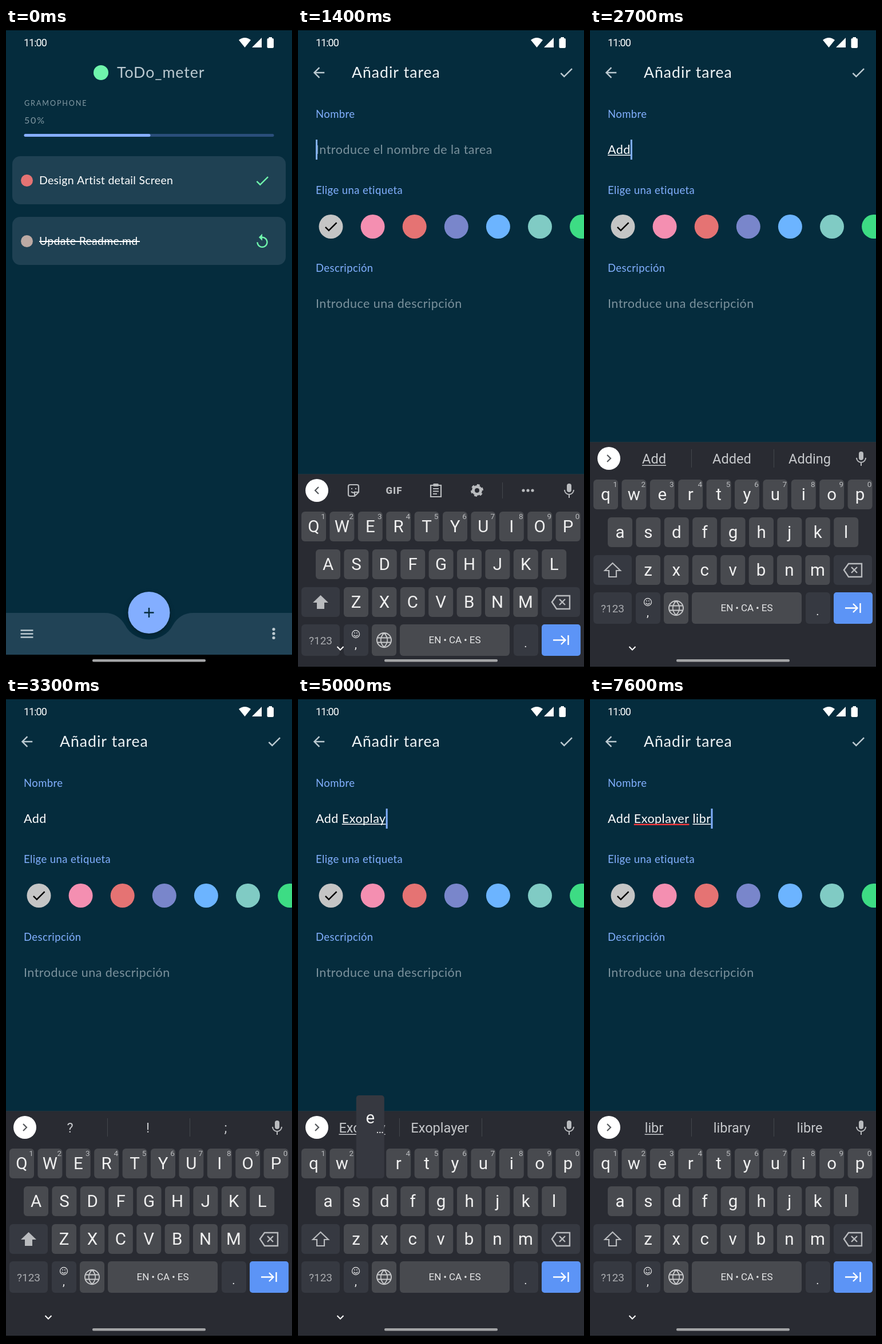
These frames come from a looping animation (500 px wide and 1120 px high, 8 s). An HTML page with a canvas:

```html
<!DOCTYPE html>
<html lang="es">
<head>
<meta charset="utf-8">
<style>
html, body { margin: 0; width: 500px; height: 1120px; overflow: hidden; background: #000; }
canvas { display: block; }
</style>
</head>
<body>
<canvas id="stage" width="500" height="1120"></canvas>
<script>
const ctx = document.getElementById('stage').getContext('2d');
const LOOP = 8000, TICK = 100;
const BG = '#052c3d', KEY = '#484a4f', DARK_KEY = '#363941', ICON = '#b9bbbe';
const MINT = '#6ff5ac', BLUE = '#82b0ff', PALE = '#bccad1', WHITE = '#fff';

// Text styles: font and letter spacing
const APP = 'Lato, sans-serif', SYSTEM = 'Roboto, sans-serif';
const title = [`26.7px ${APP}`, .95], label = [`18.5px ${APP}`, .4];
const input = [`21.5px ${APP}`, .48], task = [`19.5px ${APP}`, .28];
const letter = [`29.5px ${SYSTEM}`, 0], word = [`23.6px ${SYSTEM}`, 0];

// Icons on a 24 unit grid
const DP = 1.216;
const CHECK = 'M9 16.170L4.830 12l-1.420 1.410L9 19 21 7l-1.410-1.410z';
const BACK = 'M20 11H7.830l5.590-5.590L12 4l-8 8 8 8 1.410-1.410L7.830 13H20z';
const PLUS = 'M19 13h-6v6h-2v-6H5v-2h6V5h2v6h6z';
const MENU = 'M3 18h18v-2H3zM3 13h18v-2H3zM3 6v2h18V6z';
const REPLAY = 'M12 5V1L7 6l5 5V7c3.310 0 6 2.690 6 6s-2.690 6-6 6-6-2.690-6-6H4c0 4.420 3.580 8 8 8s8-3.580 8-8-3.580-8-8-8z';

// Typing: key down, commit, settled text, word being typed, suggestions
const typing = [
  [1300, 1300, '', '', null],
  [1700, 2100, '', 'A', 'A|And|Ara'],
  [2400, 2500, '', 'Ad', 'Ad|Add|And'],
  [2600, 2700, '', 'Add', 'Add|Added|Adding'],
  [2800, 2800, 'Add ', '', '?|!|;'],
  [3400, 3500, 'Add ', 'E', 'E|Each|Every'],
  [3700, 3800, 'Add ', 'Ex', 'Ex|Extra|Exit'],
  [3900, 4000, 'Add ', 'Exo', 'Exo|Exotic|Exodus'],
  [4200, 4200, 'Add ', 'Exop', 'Exop|Exoplanet|Exoplayer'],
  [4400, 4400, 'Add ', 'Exopl', 'Exopl|Exoplayer|Exoplanet'],
  [4600, 4600, 'Add ', 'Exopla', 'Exopla|Exoplayer|'],
  [4800, 4900, 'Add ', 'Exoplay', 'Exoplay|Exoplayer|'],
  [5000, 5100, 'Add ', 'Exoplaye', 'Exoplaye|Exoplayer|'],
  [5200, 5300, 'Add ', 'Exoplayer', 'Exoplayer||'],
  [5400, 5400, 'Add Exoplayer ', '', '?|!|;'],
  [5600, 5700, 'Add Exoplayer ', 'l', 'l|library|like'],
  [5900, 5900, 'Add Exoplayer ', 'li', 'li|like|little'],
  [6300, 6400, 'Add Exoplayer ', 'lib', 'lib|library|liberty'],
  [6500, 6600, 'Add Exoplayer ', 'libr', 'libr|library|libre'],
].map(([down, time, settled, current, hints]) => ({ down, time, settled, current, hints }));

function setStyle([font, spacing]) {
  ctx.font = font;
  ctx.letterSpacing = spacing + 'px';
}
function text(str, x, y, style, color, align = 'left') {
  setStyle(style);
  ctx.fillStyle = color;
  ctx.textAlign = align;
  ctx.fillText(str, x, y);
}
function textWidth(str, style) {
  setStyle(style);
  return ctx.measureText(str).width;
}
function rect(x, y, w, h, color, r = 0) {
  ctx.fillStyle = color;
  ctx.beginPath();
  ctx.roundRect(x, y, w, h, r);
  ctx.fill();
}
function circle(x, y, r, color) {
  ctx.fillStyle = color;
  ctx.beginPath();
  ctx.arc(x, y, r, 0, 7);
  ctx.fill();
}
function fill(d, color) {
  ctx.fillStyle = color;
  ctx.fill(new Path2D(d));
}
function stroke(d, color, width = 2.4, cap = 'butt') {
  ctx.strokeStyle = color;
  ctx.lineWidth = width;
  ctx.lineCap = cap;
  ctx.stroke(new Path2D(d));
}
function icon(d, x, y, color) {
  ctx.save();
  ctx.translate(x - 12 * DP, y - 12 * DP);
  ctx.scale(DP, DP);
  fill(d, color);
  ctx.restore();
}
// SVG path of a full circle
const ring = (x, y, r) => `M${x - r} ${y}a${r} ${r} 0 1 0 ${2 * r} 0a${r} ${r} 0 1 0 ${-2 * r} 0`;

function statusBar() {
  text('11:00', 31, 32, [`18px ${SYSTEM}`, -1], WHITE);
  fill('M407 21Q417.500 13 428 21L417.500 34ZM430 34L447 17V34Z', WHITE);
  rect(456.5, 18, 11.5, 17, WHITE, 2);
  rect(459.5, 16, 5.5, 4, WHITE);
}

function taskCard(y, color, name, action) {
  rect(11, y, 478, 84, '#1f4153', 14);
  circle(36.5, y + 42.5, 10.5, color);
  text(name, 58, y + 49, task, WHITE);
  icon(action, 448, y + 43, MINT);
}

function homeScreen() {
  circle(166, 78, 13, MINT);
  text('ToDo_meter', 194, 87, title, PALE);
  text('GRAMOPHONE', 32, 136, [`12.6px ${APP}`, 1.9], '#8299a3');
  text('50%', 32, 167, [`16px ${APP}`, 1.8], '#8299a3');
  stroke('M34 187.500H466', '#2a4e7b', 5, 'round');
  stroke('M34 187.500H250', '#86aeff', 5, 'round');

  taskCard(224, '#e57373', 'Design Artist detail Screen', CHECK);
  taskCard(330, '#bcaaa4', 'Update Readme.md', REPLAY);
  stroke('M58 373H234', WHITE, 1.8);

  fill('M0 1022H172C190 1022 200 1030 208 1043A47.400 47.400 0 0 0 292 1043C300 1030 310 1022 328 1022H500V1095H0Z', '#214356');
  ctx.save();
  ctx.shadowColor = 'rgba(0,0,0,.3)';
  ctx.shadowBlur = 8;
  ctx.shadowOffsetY = 3;
  circle(250, 1021.5, 36.5, '#83aeff');
  ctx.restore();
  icon(PLUS, 250, 1021.5, BG);
  icon(MENU, 36.5, 1058.5, PALE);
  for (const y of [1050.5, 1058, 1065.5]) circle(468, y, 2.6, PALE);
}

function addScreen(t, state) {
  icon(BACK, 36.5, 78, PALE);
  text('Añadir tarea', 94, 87, title, '#eef3f5');
  icon(CHECK, 469, 78, PALE);
  text('Nombre', 31, 157, label, BLUE);
  text('Elige una etiqueta', 31, 290, label, BLUE);
  text('Descripción', 31, 426, label, BLUE);
  text('Introduce una descripción', 31, 489, input, '#7b929d');

  ['#c5c5c5', '#f48fb1', '#e57373', '#7986cb', '#6cb4ff', '#80cbc4', '#3ddc84']
    .forEach((color, i) => circle(57.5 + 73.1 * i, 347, 21, color));
  icon(CHECK, 57.5, 347, '#000');

  const { settled = '', current = '', time } = state || {};
  const typed = settled + current;
  if (typed) text(typed, 31, 220, input, WHITE);
  else text('Introduce el nombre de la tarea', 31, 220, input, '#7b929d');
  if (!state) return;

  const xAfter = str => 31 + textWidth(str, input);
  if (current) rect(xAfter(settled), 221.5, xAfter(typed) - xAfter(settled), 1.5, WHITE);
  if (settled.includes('Exo')) {
    const start = xAfter('Add ');
    rect(start, 221.5, xAfter('Add Exoplayer') - start, 2.5, '#f0383c');
  }
  if ((t - time) % 1000 < 500) rect(xAfter(typed), 195, 3, 35, BLUE);
}

function toolbar() {
  stroke('M106 755V745Q106 742 103 742H91Q88 742 88 745V759Q88 762 91 762H99ZM99 762V755H106M93 749h2M100 749h2M93 754Q97 758 100 754', ICON, 2.2);
  text('GIF', 168, 758, [`900 17px ${SYSTEM}`, 1], ICON, 'center');
  stroke('M232 743H250V763H232ZM236 749H246M236 753.500H246M236 758H243', ICON, 2.2);
  rect(236, 740, 10, 5, ICON, 2);
  stroke(ring(313, 752, 6.5), ICON, 5);
  ctx.setLineDash([4.7, 4.7]);
  stroke(ring(313, 752, 9), ICON, 4);
  ctx.setLineDash([]);
  rect(357, 738, 1, 28, '#44474d');
  for (const x of [394, 402, 410]) circle(x, 752, 2.6, ICON);
}

function suggestions(state) {
  state.hints.split('|').forEach((hint, i) => {
    const x = 112 + 136 * i;
    text(hint, x, 761, word, '#c6c8cb', 'center');
    if (!i && state.current) {
      const w = textWidth(hint, word);
      rect(x - w / 2, 763.5, w, 1.5, '#c6c8cb');
    }
  });
  rect(177, 736, 1, 32, '#44474d');
  rect(321, 736, 1, 32, '#44474d');
}

function keyPopup(char, [x, y]) {
  rect(x - 3, y - 93, 49, 145, '#363840', 5);
  text(char, x + 21.5, y - 44, letter, '#f0f0f0', 'center');
  if (/[aeiouy]/i.test(char)) text('...', x + 38, y - 27, [`20px ${SYSTEM}`, -1], '#f0f0f0', 'center');
}

function keyboard(t, state) {
  const slide = { 1300: 220, 1400: 56 }[t] || 0;
  const upper = t < 2100 || (t >= 3100 && t < 3500);
  ctx.save();
  ctx.beginPath();
  ctx.rect(0, 0, 500, 1116);
  ctx.clip();
  ctx.translate(0, slide);
  rect(0, 724, 500, 392, '#292b32');
  rect(0, 723, 500, 1, '#20323c');

  circle(33, 752, 20, WHITE);
  stroke(state.hints ? 'M30 746L36 752L30 758' : 'M36 746L30 752L36 758', '#55585c', 2.2);
  if (state.hints) suggestions(state);
  else toolbar();
  rect(470, 740, 8, 15, ICON, 4);
  stroke('M466 751a8 8 0 0 0 16 0M474 759V765', ICON, 2);

  const places = {};
  [['qwertyuiop', 6, 789], ['asdfghjkl', 31, 855], ['zxcvbnm', 80, 921]].forEach(([chars, left, y], row) => {
    [...chars].forEach((char, i) => {
      const x = left + 49.4 * i;
      places[char] = [x, y];
      rect(x, y, 43, 52, KEY, 6);
      text(upper ? char.toUpperCase() : char, x + 21.5, y + 36, letter, '#f0f0f0', 'center');
      if (!row) text((i + 1) % 10, x + 38, y + 13, [`13.5px ${SYSTEM}`, 0], ICON, 'center');
    });
  });

  rect(6, 921, 67, 52, t === 3000 ? '#555860' : DARK_KEY, 6);
  const arrow = 'M39.500 935L53 948H46V959H33V948H26Z';
  if (upper) fill(arrow, ICON);
  else stroke(arrow, ICON, 2.2);
  rect(426, 921, 67, 52, DARK_KEY, 6);
  stroke('M444 947L452 936H475V959H452ZM457 942L467 952M467 942L457 952', ICON, 2.4);

  rect(6, 986, 67, 55, DARK_KEY, 6);
  text('?123', 39.5, 1020.5, [`19px ${SYSTEM}`, 0], '#a9abaf', 'center');
  rect(80, 986, 43, 55, DARK_KEY, 6);
  stroke(ring(101, 1003, 6.5) + 'M97.500 1004.500Q101 1009 104.500 1004.500M98 1001h2M102 1001h2', '#d0d1d3', 1.4);
  text(',', 101, 1028, [`20px ${SYSTEM}`, 0], '#f0f0f0', 'center');
  rect(129, 986, 43, 55, KEY, 6);
  stroke(ring(150.5, 1013.5, 12.5) + 'M138 1009.500H163M138 1017.500H163M150.500 1001C143 1009 143 1018 150.500 1026C158 1018 158 1009 150.500 1001', '#c8c9cb', 1.9);
  rect(178, 986, 192, 55, KEY, 6);
  text('EN • CA • ES', 274, 1019, [`17px ${SYSTEM}`, -.1], '#e4e5e6', 'center');
  rect(377, 986, 43, 55, DARK_KEY, 6);
  text('.', 398, 1026, [`20px ${SYSTEM}`, 0], '#f0f0f0', 'center');
  rect(426, 986, 68, 55, '#5c94f6', 5);
  stroke('M446 1013.500H467M460 1006L467.500 1013.500L460 1021M472.500 1005V1022', WHITE, 2.4);

  const next = typing.find(step => t >= step.down && t < step.time);
  if (next) {
    const char = next.current.slice(-1);
    keyPopup(char, places[char.toLowerCase()]);
  }
  ctx.restore();
  stroke('M68.500 1081L74 1086.500L79.500 1081', WHITE, 2);
}

function draw(now) {
  const t = Math.floor(now % LOOP / TICK) * TICK;
  const state = typing.findLast(step => t >= step.time);
  const blend = t < 500 ? 0 : { 500: .3, 600: .75 }[t] || 1;

  rect(0, 0, 500, 1120, '#000');
  rect(0, 4, 500, 1091, BG);
  statusBar();
  ctx.globalAlpha = 1 - blend;
  if (blend < 1) homeScreen();
  ctx.globalAlpha = blend;
  if (blend) addScreen(t, state);
  ctx.globalAlpha = 1;
  if (state) keyboard(t, state);
  rect(151, 1103, 198, 4.5, '#a3a4a6', 2);
}

let start;
function tick(now) {
  start ??= now;
  draw(now - start);
  requestAnimationFrame(tick);
}
requestAnimationFrame(tick);
</script>
</body>
</html>
```
